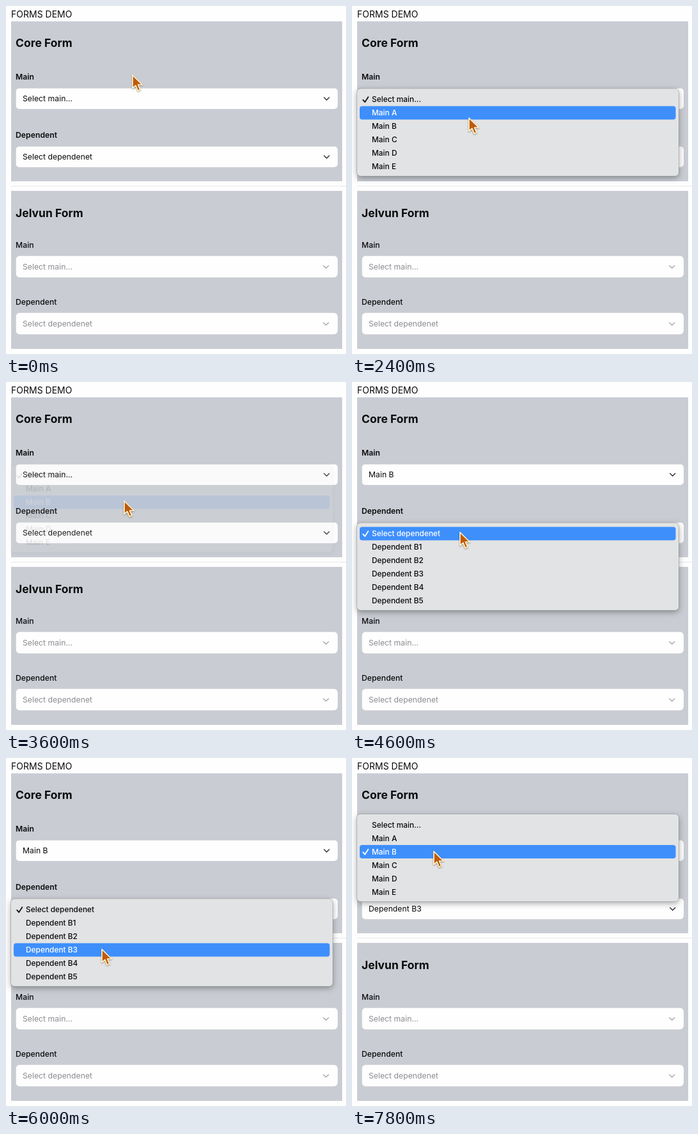
Write an HTML page that moves like this. It is 532 px wide and 544 px high and loops after 8 s.

```html
<!DOCTYPE html>
<html lang="en">
<head>
<meta charset="utf-8">
<title>Forms demo</title>
<style>
  html, body { margin: 0; width: 100%; height: 100%; overflow: hidden; background: #fefefe; }
  svg { display: block; width: 532px; height: 544px; font: 12.25px Inter, sans-serif; fill: #0b0b0d; }
  .panel { fill: #c9cdd3; }
  .title { font-size: 17.5px; font-weight: 700; }
  .strong { font-weight: 600; }
  .medium { font-weight: 500; }
  .field { fill: #fefefe; filter: drop-shadow(0 .5px .7px rgba(40, 45, 60, .3)); }
  .muted { fill: #8c8d92; }
  .chevron, .check { fill: none; stroke: #2d3039; stroke-width: 1.4; stroke-linecap: round; stroke-linejoin: round; }
  .chevron.muted { stroke: #92949a; stroke-width: 1.2; }
  .menu { font-size: 11.9px; font-weight: 450; }
  .sheet { fill: #e2e3e4; stroke: rgba(0, 0, 0, .24); stroke-width: .8; filter: drop-shadow(0 3px 5px rgba(0, 0, 0, .32)); }
  .bar { fill: #3e8ffc; }
  .check { stroke: #111; stroke-width: 1.8; }
  .row.on text { fill: #fff; }
  .row.on .check { stroke: #fff; }
  .cursor { fill: #bd5b0e; stroke: #fff4d2; stroke-width: 1.7; stroke-linejoin: round; filter: drop-shadow(0 1px 1.2px rgba(70, 45, 0, .5)); }
</style>
</head>
<body>
<svg id="stage" viewBox="0 0 532 544"></svg>
<script>
const stage = document.getElementById('stage');
const LOOP = 8000, TICK = 200, ROW = 21, FADE = 225;

function add(parent, tag, attrs, text) {
  const node = document.createElementNS('http://www.w3.org/2000/svg', tag);
  for (const key in attrs) node.setAttribute(key, attrs[key]);
  if (text) node.textContent = text;
  return parent.appendChild(node);
}
const label = (x, y, text, cls = '', parent = stage) => add(parent, 'text', { x, y, class: cls }, text);
const rect = (x, y, width, height, cls, rx = 0, parent = stage) =>
  add(parent, 'rect', { x, y, width, height, rx, class: cls });

function field(y, height, text, muted = '') {
  const mid = y + height / 2;
  rect(15.5, y, 503.5, height, 'field', muted ? 6 : 5);
  const x = muted ? 496.7 : 497.7;
  add(stage, 'path', { d: `M${x} ${mid - 1.7}l4 4 4-4`, class: 'chevron ' + muted });
  return label(26, mid + 4.7, text, muted);
}

function makeMenu({ top, items, checked, open, close }) {
  const group = add(stage, 'g', { class: 'menu' });
  rect(7.5, top, 504, 137, 'sheet', 6, group);
  const bar = rect(12, 0, 494.5, ROW, 'bar', 4, group);
  const rows = items.map((text, i) => {
    const mid = top + 17 + i * ROW;
    const row = add(group, 'g', { class: 'row' });
    label(31, mid + 4, text, '', row);
    if (i === checked) add(row, 'path', { d: `M17.3 ${mid + .8}l2.9 3.4 5.2-8`, class: 'check' });
    return row;
  });
  return t => {
    const opacity = t < open ? 0 : Math.max(0, Math.min(1, 1 - (t - close) / FADE));
    group.style.display = opacity ? '' : 'none';
    if (!opacity) return;
    group.style.opacity = opacity;
    const pointerY = cursorAt(Math.min(t, close))[1];
    const active = Math.floor((pointerY - top - 6.5) / ROW);
    bar.style.display = rows[active] ? '' : 'none';
    bar.setAttribute('y', top + 6.5 + active * ROW);
    rows.forEach((row, i) => row.classList.toggle('on', i === active));
  };
}

// time, x, y of the pointer tip
const PATH = [
  [0, 198, 108], [600, 190, 144], [1200, 188, 150], [1800, 185, 160], [2400, 183, 175],
  [2800, 184, 186], [3600, 185, 186], [4200, 171, 233], [4600, 169, 235], [5200, 160, 263],
  [6000, 150, 299], [6600, 149, 298], [7200, 130, 150], [7800, 128, 146], [8000, 128, 146]
];
function cursorAt(t) {
  const i = Math.max(1, PATH.findIndex(p => p[0] >= t));
  const [t0, x0, y0] = PATH[i - 1], [t1, x1, y1] = PATH[i];
  const k = (t - t0) / (t1 - t0);
  return [x0 + (x1 - x0) * k, y0 + (y1 - y0) * k];
}

label(8, 18, 'FORMS DEMO').style.fontSize = '14px';
rect(8, 24, 518, 250, 'panel');
rect(8, 281, 524, 1, '').style.fill = '#e7e8ea';
rect(8, 289, 518, 247, 'panel');

label(15, 64, 'Core Form', 'title');
label(15, 114.6, 'Main', 'strong');
const mainValue = field(128.5, 32.5, 'Select main...');
label(15, 205.6, 'Dependent', 'strong');
const dependentValue = field(219.5, 32.5, 'Select dependenet');

label(15, 329.5, 'Jelvun Form', 'title');
label(15, 378, 'Main', 'medium');
field(390.5, 34, 'Select main...', 'muted');
label(15, 467, 'Dependent', 'medium');
field(479.5, 34, 'Select dependenet', 'muted');

const mains = ['Select main...', ...[...'ABCDE'].map(c => 'Main ' + c)];
const dependents = ['Select dependenet', ...[1, 2, 3, 4, 5].map(n => 'Dependent B' + n)];
const menus = [
  { top: 129, items: mains, checked: 0, open: 800, close: 3400 },
  { top: 220, items: dependents, checked: 0, open: 4400, close: 6400 },
  { top: 87.5, items: mains, checked: 2, open: 7400, close: LOOP }
].map(makeMenu);

const cursor = add(stage, 'path', { class: 'cursor', d: 'M0 0V20.5L4.8 16.4 8.3 24.5 12 22.8 8.6 15H15.2Z' });

function draw(now) {
  const t = Math.floor((now % LOOP) / TICK) * TICK;
  mainValue.textContent = t < 3800 ? mains[0] : mains[2];
  dependentValue.textContent = t < 6800 ? dependents[0] : dependents[3];
  menus.forEach(update => update(t));
  cursor.setAttribute('transform', `translate(${cursorAt(t)})`);
}

const start = performance.now();
function frame() {
  draw(performance.now() - start);
  requestAnimationFrame(frame);
}
frame();
</script>
</body>
</html>
```
